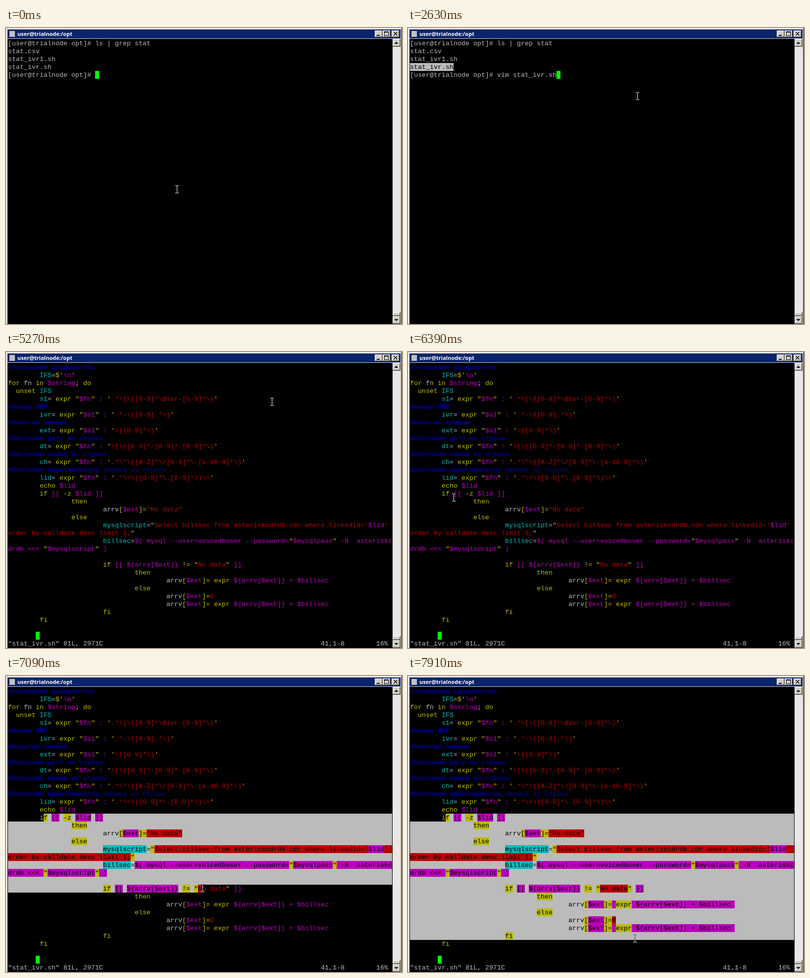
Animation of 800 by 600 pixels, one loop 8 s. Source, as an HTML page with a canvas:

```html
<!DOCTYPE html>
<html lang="en">
<head>
<meta charset="utf-8">
<title>Terminal</title>
<style>
html, body { margin: 0; width: 100%; height: 100%; overflow: hidden; background: #000; }
canvas { display: block; }
</style>
</head>
<body>
<canvas id="stage" width="800" height="600"></canvas>

<!-- "~" plus a letter switches the text colour -->
<script type="text/plain" id="shell">
[user@trialnode opt]# ls | grep stat
stat.csv
stat_ivr1.sh
stat_ivr.sh
[user@trialnode opt]# 
</script>
<script type="text/plain" id="editor">
~b#Указываем разделитель
        ~cIFS~w=~y$'~m\n~y'
~yfor ~wfn ~yin ~m$string~w; ~ydo
  ~yunset ~cIFS
        ~cs1~w=~m`~yexpr "~m$fn~y" ~m: ~y'~r.*\[\([0-9]*\@ivr-[0-9]*\)~y'~m`
~b#Номер ИВР
        ~civr~w=~m`~yexpr "~m$s1~y" ~m: ~y'~r.*-\([0-9].*\)~y'~m`
~b#Нажатый символ
        ~cext~w=~m`~yexpr "~m$s1~y" ~m: ~y'~r\([0-9]*\)~y'~m`
~b#Получаем дату из строки
        ~cdt~w=~m`~yexpr "~m$fn~y" ~m: ~y'~r\[\([0-9]*-[0-9]*-[0-9]*\)~y'~m`
~b#Получаем канал из строки
        ~cch~w=~m`~yexpr "~m$fn~y" ~m: ~y'~r.*\"\([A-Z]*\/[0-9]*\-[a-z0-9]*\)~y'~m`
~b#Получаем идентификатор звонка из строки
        ~clid~w=~m`~yexpr "~m$fn~y" ~m: ~y'~r.*\=\([0-9]*\.[0-9]*\)\=~y'~m`
        ~yecho ~m$lid
        ~yif~w ~m[[~w ~y-z~w ~m$lid~w ~m]]
                ~ythen
                        arrv~y[~m$ext~y]=~r"No data"
                ~yelse
                        ~cmysqlscript~w=~y"~rSelect billsec from asteriskcdrdb.cdr where linkedid='~m$lid~r' ~w
~rorder by calldate desc limit 1;~y"
                        ~cbillsec~w=~m$( mysql --user=voicedbuser --password=~y"~m$mysqlpass~y"~m -N  asteriskc
~mdrdb <<< ~y"~m$mysqlscript~y"~m )

                        ~yif~w ~m[[~w ~m${arrv[$ext]}~w ~y!=~w ~y"~rNo data~y"~w ~m]]
                                ~ythen
                                        arrv~y[~m$ext~y]=~m`~yexpr~m ${arrv[$ext]} + $billsec`
                                ~yelse
                                        arrv~y[~m$ext~y]=~r0
                                        arrv~y[~m$ext~y]=~m`~yexpr~m ${arrv[$ext]} + $billsec`
                        ~yfi
        ~yfi
</script>

<script>
const ctx = document.getElementById('stage').getContext('2d');
const LOOP = 8000, COLS = 97, ROWS = 36, CELL_W = 8, CELL_H = 16, LEFT = 4, TOP = 23;
const FACE = '#d4d0c8', NAVY = '#0a246a';
const INK = { w: '#bbb', y: '#bb0', m: '#b0b', c: '#0bb', r: '#b00', b: '#00b' };

// [time, value...]; each entry holds until the next one
const TYPED = [[0, ''], [1010, 'v'], [1130, 'vi'], [1250, 'vim '], [2500, 'vim stat_ivr.sh']];
const MOUSE = [
  [0, 345, 327], [1840, 79, 249], [1970, 58, 123], [2110, 62, 87], [2630, 463, 138],
  [5270, 537, 101], [5410, 432, 190], [5540, 323, 279], [5690, 326, 277],
  [5840, 250, 274], [5970, 149, 289], [6120, 124, 296], [6250, 104, 299],
  [6390, 92, 295], [6520, 84, 290], [6670, 79, 285], [6950, 140, 297],
  [7090, 397, 430], [7220, 440, 468], [7360, 455, 497], [7490, 460, 517],
  [7640, 462, 524], [7780, 460, 528], [7910, 458, 532]
];
const WORD_SELECTED = 2360, CLEARED = 3210, FILE_SHOWN = 3370, DRAG_SHOWN = 6950;

const at = (steps, t) => steps.findLast(step => step[0] <= t);

function rect(color, x, y, w, h) {
  ctx.fillStyle = color;
  ctx.fillRect(x, y, w, h);
}

function parseLine(line) {
  const cells = [];
  let ink = 'w';
  for (let i = 0; i < line.length; i++) {
    if (line[i] === '~') ink = line[++i];
    else cells.push([line[i], ink]);
  }
  return cells;
}

const readScreen = id =>
  document.getElementById(id).textContent.slice(1, -1).split('\n').map(parseLine);

const shell = readScreen('shell');
const editor = readScreen('editor');
const message = '"stat_ivr.sh" 81L, 2971C';
const blank = [];
blank[ROWS - 1] = parseLine(message);
editor[ROWS - 1] = parseLine(message.padEnd(79) + '41,1-8'.padEnd(14) + '16%');

function bevel(x, y, w, h) {
  rect('#404040', x, y, w, h);
  rect('#fff', x, y, w - 1, h - 1);
  rect('#808080', x + 1, y + 1, w - 2, h - 2);
  rect(FACE, x + 1, y + 1, w - 3, h - 3);
}

function arrow(y, direction) {
  for (let i = 0; i < 4; i++) rect('#000', 788 - i, y + i * direction, 2 * i + 1, 1);
}

function drawWindow() {
  rect(FACE, 0, 0, 800, 600);
  rect('#fff', 1, 1, 798, 1);
  rect('#fff', 1, 1, 1, 599);
  rect('#808080', 798, 1, 1, 599);
  rect('#404040', 799, 0, 1, 600);
  rect(NAVY, 3, 3, 794, 18);
  rect('#c0c0c0', 7, 6, 11, 12);
  ctx.font = 'bold 11px "Noto Sans", sans-serif';
  ctx.fillStyle = '#fff';
  ctx.fillText('user@trialnode:/opt', 23, 16);

  for (const x of [745, 761, 779]) bevel(x, 5, 16, 14);
  rect('#000', 749, 14, 6, 2);
  rect('#000', 764, 7, 9, 9);
  rect(FACE, 765, 9, 7, 6);
  for (let i = 0; i < 7; i++) {
    rect('#000', 783 + i, 8 + i, 2, 1);
    rect('#000', 789 - i, 8 + i, 2, 1);
  }

  rect('#eae8e4', 781, 22, 16, 578);
  bevel(781, 22, 16, 16);
  bevel(781, 576, 16, 8);
  bevel(781, 584, 16, 16);
  arrow(28, 1);
  arrow(593, -1);
  rect('#000', 3, 22, 778, 578);
}

// Selected range as linear cell positions [from, to)
function selection(t, screen, x, y) {
  if (t >= WORD_SELECTED && t < CLEARED) return [3 * COLS, 3 * COLS + 11];
  if (t < DRAG_SHOWN) return [0, 0];
  const row = Math.floor((y - TOP) / CELL_H);
  const col = Math.round((x - LEFT) / CELL_W);
  const end = col >= screen[row].length ? COLS : col;
  return [16 * COLS + 9, row * COLS + end];
}

function drawText(screen, [from, to]) {
  ctx.font = '13.3333px "Liberation Mono", monospace';
  for (let row = 0; row < ROWS; row++) {
    const y = TOP + row * CELL_H;
    const line = screen[row] || [];
    for (let col = 0; col < COLS; col++) {
      const [char, ink] = line[col] || [' ', 'w'];
      const pos = row * COLS + col;
      const selected = pos >= from && pos < to;
      const x = LEFT + col * CELL_W;
      if (selected) rect(INK[ink], x, y, CELL_W, CELL_H);
      if (char === ' ') continue;
      ctx.fillStyle = selected ? '#000' : INK[ink];
      ctx.fillText(char, x, y + 12);
    }
  }
}

function drawBlock(row, col) {
  rect('#0f0', LEFT + col * CELL_W, TOP + row * CELL_H, CELL_W, CELL_H);
}

// The pointer inverts whatever is below it
function drawPointer(x, y) {
  ctx.globalCompositeOperation = 'difference';
  for (const edge of [y - 8, y + 7]) {
    rect('#fff', x - 3, edge, 3, 1);
    rect('#fff', x + 1, edge, 3, 1);
  }
  rect('#fff', x, y - 7, 1, 14);
  ctx.globalCompositeOperation = 'source-over';
}

function draw(t) {
  const [, x, y] = at(MOUSE, t);
  const typed = at(TYPED, t)[1];
  let screen = editor;
  if (t < CLEARED) screen = [...shell.slice(0, 4), [...shell[4], ...parseLine(typed)]];
  else if (t < FILE_SHOWN) screen = blank;

  drawWindow();
  drawText(screen, selection(t, screen, x, y));
  if (t < CLEARED) drawBlock(4, screen[4].length);
  else if (t >= FILE_SHOWN) drawBlock(34, 7);
  drawPointer(x, y);
}

const start = performance.now();
function tick() {
  draw((performance.now() - start) % LOOP);
  requestAnimationFrame(tick);
}
tick();
</script>
</body>
</html>
```
